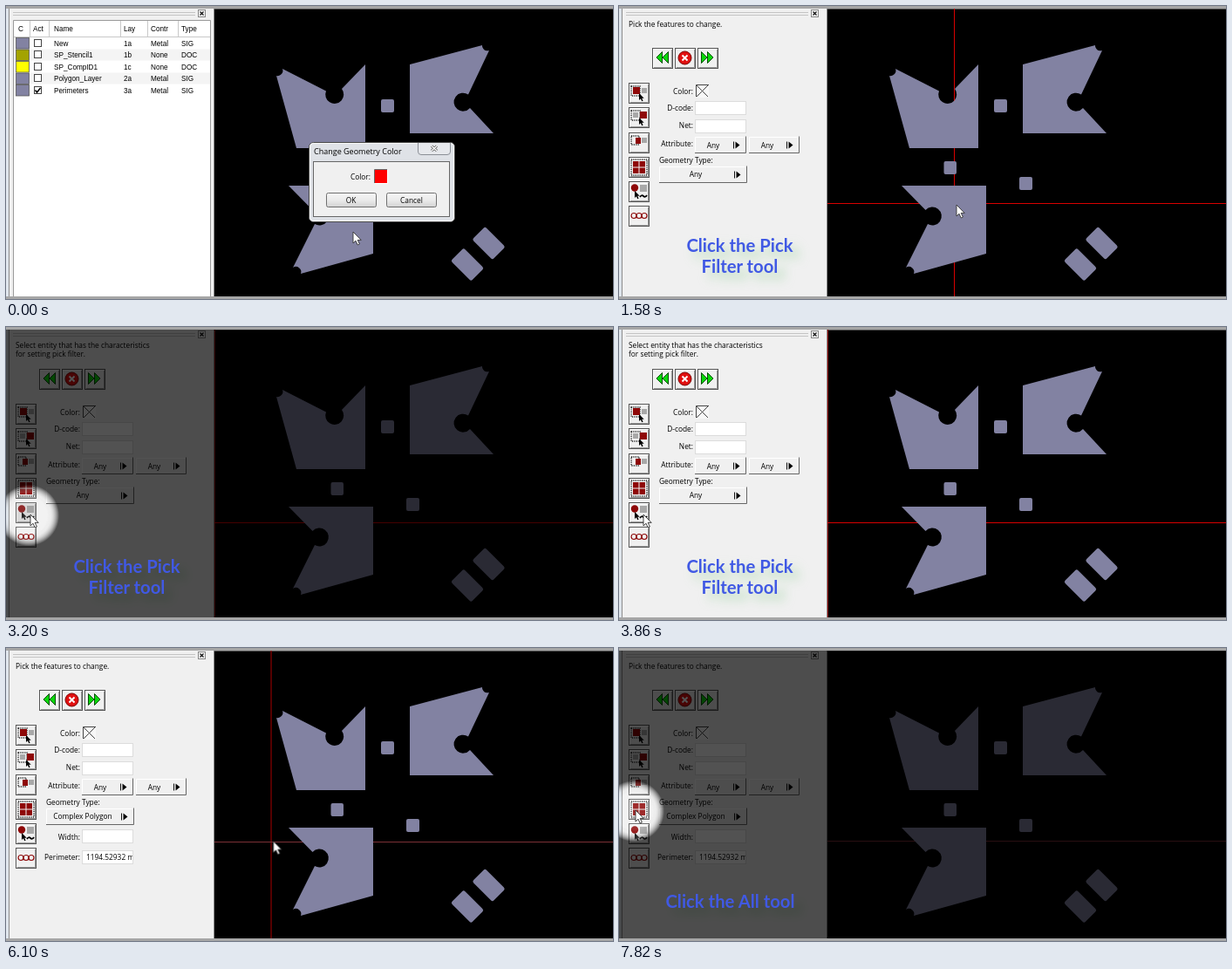
An HTML page that plays this animation: 696 by 336 pixels, repeating every 8 s.

```html
<!DOCTYPE html>
<html lang="en">
<head>
<meta charset="utf-8">
<title>Pick filter walkthrough</title>
<style>
html, body { margin: 0; width: 100%; height: 100%; overflow: hidden; background: #000; }
svg { display: block; width: 696px; height: 336px; }
text { font: 8.35px "Open Sans", "Noto Sans", sans-serif; fill: #000; white-space: pre; }
.list text { font: 8.2px "Liberation Sans", Arial, sans-serif; }
text.big { font: bold 20.3px Lato, sans-serif; fill: inherit; text-anchor: middle; }
.caption { fill: #4059e4; }
.glow { fill: #b4dcb8; }
.mid { text-anchor: middle; }
.end { text-anchor: end; }
.cross { stroke-width: 1; shape-rendering: crispEdges; }

/* one loop is 8 s, so 1% is 80 ms */
.x { animation: x 8s linear infinite; }
.y { animation: y 8s linear infinite; }
.hline { animation: level 8s linear infinite, hcolor 8s step-end infinite; }
.vline { animation: vshow 8s step-end infinite; }
.vedge { animation: vedge 8s step-end infinite; }
.list, .dialog { animation: intro 8s step-end infinite; }
.tools { animation: tools 8s step-end infinite; }
.pick { animation: pick 8s step-end infinite; }
.select { animation: select 8s step-end infinite; }
.any { animation: any 8s step-end infinite; }
.complex { animation: complex 8s step-end infinite; }
.press { animation: press 8s step-end infinite; }
.hover { animation: hover 8s linear infinite; }
.dim { animation: dim 8s linear infinite; }
.cap1 { animation: cap1 8s linear infinite; }
.cap2 { animation: cap2 8s linear infinite; }

@keyframes x {
  0%, 4.625% { transform: translateX(398px); }
  10.25%, 14.125% { transform: translateX(394px); }
  19.75%, 21% { transform: translateX(387px); }
  24.1%, 24.5% { transform: translateX(336px); }
  27.5% { transform: translateX(239px); }
  32.25%, 32.7% { transform: translateX(36px); }
  34.375%, 36.5% { transform: translateX(27px); }
  36.6%, 50% { transform: translateX(28px); }
  56% { transform: translateX(239px); }
  59.9%, 61.1% { transform: translateX(326px); }
  63.25%, 64.1% { transform: translateX(345px); }
  65.9%, 69.4% { transform: translateX(352px); }
  71.5%, 74.5% { transform: translateX(350px); }
  79% { transform: translateX(239px); }
  84.4% { transform: translateX(86px); }
  85.75%, 86.1% { transform: translateX(83px); }
  92.5% { transform: translateX(30px); }
  94.4% { transform: translateX(24px); }
  95.25%, 97.7% { transform: translateX(23px); }
  97.75%, 100% { transform: translateX(19px); }
}
@keyframes y {
  0%, 4.625% { transform: translateY(259px); }
  10.25%, 14.125% { transform: translateY(225px); }
  19.75%, 24.5% { transform: translateY(228px); }
  27.5% { transform: translateY(226px); }
  32.25%, 32.7% { transform: translateY(221px); }
  34.375%, 36.5% { transform: translateY(217px); }
  36.6%, 50% { transform: translateY(215px); }
  59.9%, 61.1% { transform: translateY(212px); }
  63.25%, 64.1% { transform: translateY(211px); }
  65.9%, 69.4% { transform: translateY(217px); }
  71.5%, 74.5% { transform: translateY(222px); }
  79% { transform: translateY(221px); }
  84.4%, 86.1% { transform: translateY(219px); }
  92.5% { transform: translateY(194px); }
  94.4% { transform: translateY(190px); }
  95.25%, 97.7% { transform: translateY(189px); }
  97.75%, 100% { transform: translateY(186px); }
}
@keyframes level {
  0%, 14.125% { transform: translateY(223px); }
  19.75%, 24.5% { transform: translateY(226px); }
  27.5%, 56% { transform: translateY(224px); }
  59.9%, 64.1% { transform: translateY(213px); }
  65.9%, 69.4% { transform: translateY(219px); }
  71.5%, 74.5% { transform: translateY(222px); }
  79%, 100% { transform: translateY(221px); }
}
@keyframes hcolor {
  0% { stroke: #d80000; opacity: 0; }
  14.125% { stroke: #d80000; opacity: 1; }
  59.9% { stroke: #5e5a56; opacity: 1; }
  65.9%, 100% { stroke: #7c3036; opacity: 1; }
}
@keyframes vshow {
  0% { stroke: #d80000; opacity: 0; }
  14.125% { stroke: #d80000; opacity: 1; }
  27.5% { stroke: #a80000; opacity: 0; }
  56% { stroke: #a80000; opacity: 1; }
  79%, 100% { stroke: #a80000; opacity: 0; }
}
@keyframes vedge { 0% { opacity: 0; } 27.5% { opacity: 1; } 56%, 100% { opacity: 0; } }
@keyframes intro { 0% { opacity: 1; } 14.125%, 100% { opacity: 0; } }
@keyframes tools { 0% { opacity: 0; } 14.125%, 100% { opacity: 1; } }
@keyframes pick { 0% { opacity: 1; } 40% { opacity: 0; } 74.5%, 100% { opacity: 1; } }
@keyframes select { 0% { opacity: 0; } 40% { opacity: 1; } 74.5%, 100% { opacity: 0; } }
@keyframes any { 0% { opacity: 1; } 74.5%, 100% { opacity: 0; } }
@keyframes complex { 0% { opacity: 0; } 74.5%, 100% { opacity: 1; } }
@keyframes press { 0% { opacity: 0; } 40% { opacity: 1; } 43%, 100% { opacity: 0; } }
@keyframes hover { 0%, 8% { opacity: 0; } 10.25%, 100% { opacity: 1; } }
@keyframes dim {
  0%, 32.75% { opacity: 0; }
  34.375%, 48.24% { opacity: 1; }
  48.25%, 92.5% { opacity: 0; }
  94.375%, 100% { opacity: 1; }
}
@keyframes cap1 {
  0%, 4.625% { opacity: 0; }
  10.25%, 50% { opacity: 1; }
  57%, 100% { opacity: 0; }
}
@keyframes cap2 { 0%, 77% { opacity: 0; } 83%, 100% { opacity: 1; } }
</style>
</head>
<body>
<svg viewBox="0 0 696 336" width="696" height="336">
  <defs>
    <radialGradient id="spot" gradientUnits="userSpaceOnUse" cx="-2" cy="1" r="35">
      <stop offset="0" stop-color="#fff" stop-opacity=".15"/>
      <stop offset=".6" stop-color="#fff" stop-opacity=".15"/>
      <stop offset=".72" stop-color="#ccc" stop-opacity=".08"/>
      <stop offset="1" stop-color="#000" stop-opacity=".68"/>
    </radialGradient>
    <linearGradient id="face" x2="0" y2="1">
      <stop offset="0" stop-color="#f6f6f6"/>
      <stop offset=".5" stop-color="#ebebeb"/>
      <stop offset="1" stop-color="#d3d3d3"/>
    </linearGradient>
    <linearGradient id="hot" x2="0" y2="1">
      <stop offset="0" stop-color="#eaf6fd"/>
      <stop offset="1" stop-color="#a9d9f2"/>
    </linearGradient>
    <filter id="blur" x="-30%" y="-60%" width="160%" height="240%"><feGaussianBlur stdDeviation="6"/></filter>
    <clipPath id="inner"><rect y="3" width="696" height="330"/></clipPath>
    <clipPath id="field"><rect x="88" y="232" width="57" height="16"/></clipPath>
    <path id="arrow" d="M0 0V13L3 10.2L5.2 15L7.4 14L5.2 9.4H9.2Z"/>
    <g id="words1"><text class="big" x="138.5" y="282">Click the Pick</text><text class="big" x="138.5" y="306">Filter tool</text></g>
    <g id="words2"><text class="big" x="127.5" y="298">Click the All tool</text></g>
  </defs>

  <!-- drawing area -->
  <rect width="696" height="336"/>
  <path fill="#555" d="M239 3H696V4H239Z"/>
  <g class="x"><path class="cross vline" d="M-2.5 3V333"/></g>
  <path class="cross vedge" stroke="#900000" d="M239.5 3V333"/>
  <path class="cross hline" d="M239 .5H696"/>
  <g fill="#8282a2">
    <path d="M333 163L310 80A6 6 0 0 0 317 72L367 97.5A10.5 10.5 0 1 0 385 95L412 67V163Z"/>
    <path d="M463 67L546 45A6 6 0 0 0 554 51L530 101.5A10.5 10.5 0 1 0 532 117L559 146H463Z"/>
    <path d="M324 206H421V284L338 307A6 6 0 0 0 329 300L354 250A10.5 10.5 0 1 0 351.5 234Z"/>
    <rect x="430" y="107" width="15" height="15" rx="2"/>
    <rect x="372.5" y="178" width="14.5" height="15" rx="2"/>
    <rect x="459" y="196" width="15" height="15" rx="2"/>
    <rect x="-16.5" y="-10.5" width="33" height="21" rx="2.5" transform="translate(553.5 272) rotate(45)"/>
    <rect x="-16.5" y="-10.5" width="33" height="21" rx="2.5" transform="translate(529 296.5) rotate(45)"/>
  </g>

  <!-- side panel -->
  <path fill="#f0f0f0" d="M0 0H238V336H0Z"/>
  <path fill="#dfe5ec" d="M0 3H3V333H0Z"/>
  <path fill="#8c8c8c" d="M3 3H4V333H3ZM238 3H239V333H238Z"/>
  <path stroke="#c4c4c4" d="M8 7.5H217M8 10.5H217"/>
  <rect x="220.5" y="4.5" width="8" height="8" fill="#f4f4f4" stroke="#888"/>
  <path stroke="#111" stroke-width="1.2" d="M222.5 6.5L226.5 10.5M226.5 6.5L222.5 10.5"/>

  <g class="list">
    <path fill="#fff" stroke="#999" d="M8.5 333V16.5H234.5V333"/>
    <path stroke="#c8c8c8" d="M9 35.5H234M27.5 17V35M49.5 17V35M131.5 17V35M162.5 17V35M197.5 17V35"/>
    <g id="rows"></g>
  </g>

  <g class="tools">
    <g class="pick"><text x="11" y="23.5">Pick the features to change.</text></g>
    <g class="select"><text x="11" y="24">Select entity that has the characteristics</text><text x="11" y="34">for setting pick filter.</text></g>
    <g id="buttons"></g>
    <rect class="press" x="12" y="202" width="22" height="22" fill-opacity=".12"/>
    <g id="form"></g>
    <text class="mid any" x="88" y="196">Any</text>
    <g class="complex">
      <text class="mid" x="88" y="196">Complex Polygon</text>
      <g id="extra"></g>
      <text x="92" y="243" clip-path="url(#field)">1194.52932 mm</text>
    </g>
  </g>

  <g class="dialog">
    <rect x="347.5" y="156.5" width="167" height="91" rx="5" fill="#dfe2e7" stroke="#4a4a4a"/>
    <rect x="348.5" y="157.5" width="165" height="89" rx="4" fill="none" stroke="#f8f8f8"/>
    <rect x="352.5" y="178.5" width="156" height="63" fill="#f0f0f0" stroke="#666"/>
    <path d="M472.5 157V167Q472.5 170.5 476 170.5H506Q509.5 170.5 509.5 167V157" fill="#e6e8ec" stroke="#8b8f96"/>
    <path d="M488 160.5L494 166M494 160.5L488 166" stroke="#555" stroke-width="3"/>
    <path d="M488 160.5L494 166M494 160.5L488 166" stroke="#fff" stroke-width="1.4"/>
    <text x="353" y="170" style="font-size:9px">Change Geometry Color</text>
    <text class="end" x="418" y="199">Color:</text>
    <rect x="423" y="188" width="14" height="15" fill="#f00"/>
    <path d="M422.5 203V187.5H437" fill="none" stroke="#666"/>
    <path d="M423 203.5H437.5V188" fill="none" stroke="#fff"/>
    <g fill="url(#face)" stroke="#707070">
      <rect x="367.5" y="214.5" width="57" height="16" rx="2"/>
      <rect x="436.5" y="214.5" width="57" height="16" rx="2"/>
    </g>
    <rect class="hover" x="367.5" y="214.5" width="57" height="16" rx="2" fill="url(#hot)" stroke="#3c7fb1"/>
    <text class="mid" x="395.5" y="226">OK</text>
    <text class="mid" x="465" y="226">Cancel</text>
  </g>

  <g class="glow" filter="url(#blur)" transform="translate(8 8)">
    <use class="cap1" href="#words1"/><use class="cap2" href="#words2"/>
  </g>

  <!-- spotlight that follows the pointer -->
  <g clip-path="url(#inner)"><g class="dim"><g class="x"><g class="y">
    <rect x="-700" y="-340" width="1500" height="700" fill="url(#spot)"/>
  </g></g></g></g>

  <g class="caption">
    <use class="cap1" href="#words1"/><use class="cap2" href="#words2"/>
  </g>
  <path fill="#a6a6a6" d="M0 0H696V3H0ZM0 333H696V336H0Z"/>
  <g class="x"><g class="y"><use href="#arrow" fill="#fff" stroke="#333" stroke-width=".9"/></g></g>
</svg>
<script>
const fill = (id, parts) => { document.getElementById(id).innerHTML = parts.join(''); };
const label = (x, y, s, cls = '') => `<text class="${cls}" x="${x}" y="${y}">${s}</text>`;
const box = (x, y, w, h, color) => `<rect x="${x}" y="${y}" width="${w}" height="${h}" fill="${color}"/>`;

// layer list
const columns = [14, 31, 55, 135, 166, 201];
const layers = [
  ['New', '1a', 'Metal', 'SIG', '#8282a2'],
  ['SP_Stencil1', '1b', 'None', 'DOC', '#a3a300'],
  ['SP_CompID1', '1c', 'None', 'DOC', '#ffff00'],
  ['Polygon_Layer', '2a', 'Metal', 'SIG', '#8282a2'],
  ['Perimeters', '3a', 'Metal', 'SIG', '#8282a2']
];
const head = ['C', 'Act', 'Name', 'Lay', 'Contr', 'Type'].map((s, i) => label(columns[i], 29, s));
const rows = layers.map((layer, i) => {
  const y = 42.5 + 13.5 * i;
  const tick = i === 4 ? `<path d="M33.5 ${y}l2 2.5l4-5" fill="none" stroke="#000" stroke-width="1.5"/>` : '';
  return (i % 2 ? box(28, y - 6.5, 206, 13, '#f4f4f4') : '') +
    `<rect x="11.5" y="${y - 6}" width="15" height="12.5" fill="${layer[4]}" stroke="#555" stroke-width=".8"/>` +
    `<rect x="32.5" y="${Math.round(y) - 4.5}" width="8" height="8" fill="#fff" stroke="#444"/>` + tick +
    layer.slice(0, 4).map((s, c) => label(columns[c + 2], y + 3, s)).join('');
});
fill('rows', [...head, ...rows]);

// icon buttons
const red = '#8e0808', gray = '#a8a8a8';
const dots = (x, y, w, h) =>
  `<rect x="${x}" y="${y}" width="${w}" height="${h}" fill="none" stroke="#222" stroke-width="1.4" stroke-dasharray="1.2 1.2"/>`;
const pointer = (x, y) => `<use href="#arrow" transform="translate(${x} ${y}) scale(.62)"/>`;
const chevrons = '<path fill="#0ad80a" stroke="#064d06" d="M11.5 4.5V17.5L5 11ZM18.5 4.5V17.5L12 11Z"/>';
const icons = [
  [38, 48, chevrons],
  [64, 48, '<circle cx="11.5" cy="11.5" r="7.5" fill="#e01010" stroke="#7a0000"/><path stroke="#fff" stroke-width="2" d="M8.5 8.5L14.5 14.5M14.5 8.5L8.5 14.5"/>'],
  [90, 48, `<g transform="translate(23) scale(-1 1)">${chevrons}</g>`],
  [11, 88, dots(3, 4, 10, 11) + box(5, 5, 8, 8, red) + box(15, 6, 6, 6, gray) + pointer(12, 12)],
  [11, 116, dots(3, 4, 10, 11) + box(5, 6, 6, 6, gray) + box(13, 5, 8, 8, red) + pointer(12, 12)],
  [11, 145, dots(3, 4, 9, 10) + box(8, 6, 6, 7, red) + box(15, 6, 6, 6, gray)],
  [11, 173, dots(3, 3, 18, 18) + [[5, 5], [12.5, 5], [5, 12.5], [12.5, 12.5]].map(([x, y]) => box(x, y, 6.5, 6.5, red)).join('')],
  [11, 201, `<circle cx="7" cy="7.5" r="4.2" fill="${red}"/>` + box(13, 4, 8, 8, gray) + pointer(7, 11) +
    '<path d="M13 18q2-3 4-1t4-1" fill="none" stroke="#000" stroke-width="1.8"/>'],
  [11, 229, [6, 12, 18].map(x => `<circle cx="${x}" cy="11.5" r="3" fill="none" stroke="${red}" stroke-width="1.2"/>`).join('')]
];
fill('buttons', icons.map(([x, y, art]) =>
  `<g transform="translate(${x} ${y})"><rect x=".5" y=".5" width="23" height="23" fill="#f0f0f0" stroke="#555"/>` +
  '<path d="M1.5 22V1.5H22" fill="none" stroke="#fff"/><path d="M2 22.5H22.5V2" fill="none" stroke="#999"/>' +
  art + '</g>'));

// pick form
const input = y => `<rect x="87.5" y="${y + 0.5}" width="58" height="15" fill="#fff" stroke="#dcdcdc"/>`;
const menu = (x, y, w, h) => `<rect x="${x}" y="${y}" width="${w}" height="${h}" fill="#f0f0f0"/>` +
  `<path d="M${x + 0.5} ${y + h}v${-h + 0.5}h${w}" fill="none" stroke="#fff"/>` +
  `<path d="M${x} ${y + h - 0.5}h${w - 0.5}v${-h}" fill="none" stroke="#666"/>` +
  `<path d="M${x + w - 14.5} ${y + h / 2 - 4}v8" stroke="#111"/>` +
  `<path d="M${x + w - 12.5} ${y + h / 2 - 4}v8l5-4z"/>`;
fill('form', [
  label(85, 101, 'Color:', 'end'), label(85, 120, 'D-code:', 'end'), label(85, 140, 'Net:', 'end'),
  label(85, 161, 'Attribute:', 'end'), label(46, 180, 'Geometry Type:'),
  box(88, 90, 15, 15, '#f8f8f8'),
  '<path d="M88.5 104V90.5H103M89 91L102 104M102 91L89 104" fill="none" stroke="#333" stroke-width=".9"/>',
  input(109), input(130),
  menu(87, 150, 59, 19), menu(149, 150, 58, 19), menu(46, 184, 101, 19),
  label(108, 162.5, 'Any', 'mid'), label(170, 162.5, 'Any', 'mid')
]);
fill('extra', [
  label(85, 220, 'Width:', 'end'), label(85, 243, 'Perimeter:', 'end'), input(208), input(232)
]);
</script>
</body>
</html>
```
